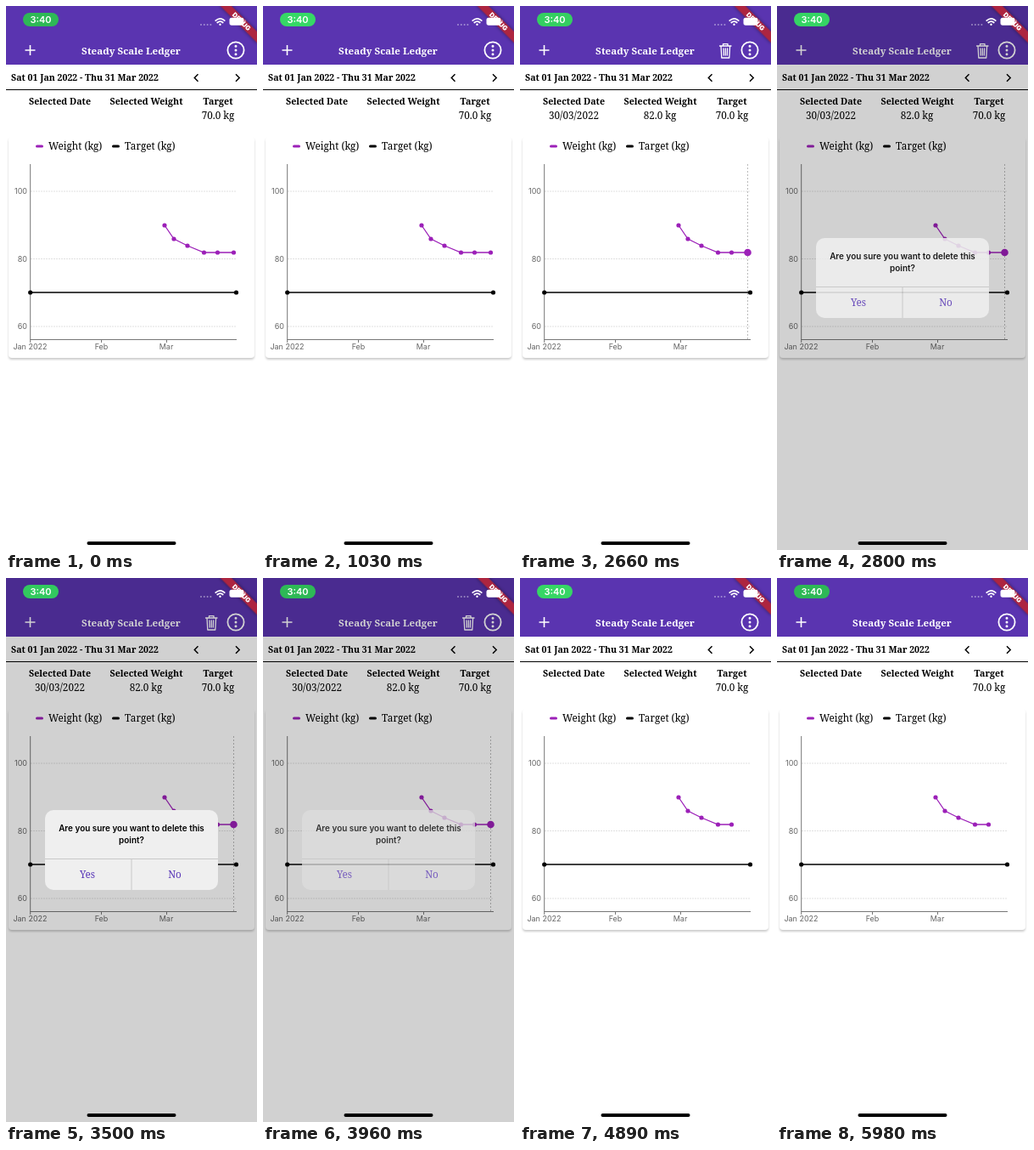
An HTML page that plays this animation: 296x640 px, repeating every 6040 ms.

```html
<!DOCTYPE html>
<html lang="en">
<head>
<meta charset="utf-8">
<title>Weight chart</title>
<style>
  html, body { margin: 0; width: 100%; height: 100%; overflow: hidden; background: #fff; }
  svg { display: block; width: 296px; height: 640px; }
  text { font: 11.7px "Noto Serif", serif; }
  .mid { text-anchor: middle; }
  .bold { font-weight: 700; font-size: 10.7px; }
  .sans, .axis text { font-family: Inter, Roboto, sans-serif; }
  .axis text { font-size: 9px; fill: #666; }
  .question { font-size: 9.95px; font-weight: 600; }
  .icon { fill: none; stroke: #fff; stroke-linecap: round; stroke-linejoin: round; }
  .grid { stroke: #e0e0e0; stroke-dasharray: 2 1; }
  .card { filter: drop-shadow(0 2.5px 1.3px #0003); }
  .ribbon { filter: drop-shadow(0 0 2.3px #0007); }
</style>
</head>
<body>
<svg viewBox="0 0 296 640">
  <clipPath id="plot"><path d="M0 180H296V393H0z"/></clipPath>

  <!-- header -->
  <path fill="#5a34b0" d="M0 0H296V69H0z"/>
  <text class="mid bold" x="147.5" y="56.5" fill="#fff" style="font-size:11.6px">Steady Scale Ledger</text>
  <g class="icon" stroke-width="1.8">
    <path d="M22.5 52h12M28.5 46v12" stroke-width="1.6" stroke-linecap="butt"/>
    <circle cx="271" cy="52" r="9.6"/>
    <path d="M271 47.3v.01M271 52v.01M271 56.7v.01" stroke-width="3"/>
  </g>
  <path id="trash" class="icon" stroke-width="1.3"
    d="M235.5 47h13.5M239.5 47v-2.4h5.5V47M237 47l.8 14h9l.8-14M240 50l.3 8M242.3 50v8M244.6 50l-.3 8"/>

  <!-- date range -->
  <text class="bold" x="6" y="88" style="font-size:10.6px">Sat 01 Jan 2022 - Thu 31 Mar 2022</text>
  <path d="M226.5 80.3l-4.2 4.2 4.2 4.2M271 80.3l4.2 4.2-4.2 4.2" fill="none" stroke="#000" stroke-width="1.5"/>
  <path d="M0 98.5H296" stroke="#000" stroke-width="1.2"/>

  <!-- summary -->
  <g class="mid">
    <text class="bold" x="63.5" y="116">Selected Date</text>
    <text class="bold" x="165.5" y="116">Selected Weight</text>
    <text class="bold" x="250" y="116">Target</text>
    <text x="250" y="133">70.0 kg</text>
    <g id="values">
      <text x="63.5" y="133">30/03/2022</text>
      <text x="165" y="133">82.0 kg</text>
    </g>
  </g>

  <!-- chart card -->
  <rect class="card" x="3" y="154" width="290" height="260" rx="4" fill="#fff"/>
  <g stroke-width="3" stroke-linecap="round">
    <path d="M36.5 165h6" stroke="#9c20b8"/>
    <path d="M126.5 165h6" stroke="#000"/>
  </g>
  <text x="50" y="169">Weight (kg)</text>
  <text x="140" y="169">Target (kg)</text>
  <path class="grid" d="M29 218H272M29 297.5H272M29 377H272"/>
  <path d="M28.7 186V392.5H272M28.7 392v4M112.5 392v4M189.5 392v4" fill="none" stroke="#777"/>
  <g class="axis">
    <g text-anchor="end">
      <text x="25" y="221">100</text>
      <text x="25" y="300.5">80</text>
      <text x="25" y="380">60</text>
    </g>
    <g class="mid">
      <text x="28.5" y="403.5">Jan 2022</text>
      <text x="112.5" y="403.5">Feb</text>
      <text x="189" y="403.5">Mar</text>
    </g>
  </g>
  <path id="guide" d="M268.5 186V392" stroke="#bbb" stroke-dasharray="2 2"/>
  <g id="series" clip-path="url(#plot)"></g>
  <circle id="marker" cx="268.5" fill="#9c20b8"/>

  <!-- dialog -->
  <path id="dim" d="M0 0H296V640H0z" opacity=".18"/>
  <g id="dialog" class="mid">
    <rect id="panel" x="46" y="273" width="204" height="94" rx="10"/>
    <text class="sans question" x="148" y="298">Are you sure you want to delete this</text>
    <text class="sans question" x="148" y="312">point?</text>
    <path d="M46 330.5H250M148 330.5V367" stroke="#c8c8c8"/>
    <g fill="#5a38b8">
      <text x="96" y="353">Yes</text>
      <text x="199" y="353">No</text>
    </g>
  </g>

  <!-- system overlay -->
  <svg width="296" height="69">
    <g transform="translate(296) rotate(45)">
      <path class="ribbon" d="M-31 21.2H31V30.4H-31z" fill="#ad2540"/>
      <text class="mid sans" y="28.6" fill="#fff" style="font-size:7.7px;font-weight:900">DEBUG</text>
    </g>
  </svg>
  <rect id="pill" x="20" y="8" width="42" height="16" rx="8"/>
  <text class="mid sans" x="41" y="20" fill="#fff" style="font-size:11px;font-weight:600">3:40</text>
  <path class="icon" d="M230 22h12" stroke-width="2" stroke-dasharray="0 3.8" opacity=".45"/>
  <g class="icon" stroke-width="1.8" stroke-linecap="butt">
    <path d="M247.3 17.2q5.2-4.6 10.4 0M249.3 19.5q3.2-2.8 6.4 0"/>
    <path d="M252.5 21.7v.01" stroke-width="2.4" stroke-linecap="round"/>
  </g>
  <rect x="263.5" y="13.7" width="17" height="9" rx="2.6" fill="#fff"/>
  <path d="M282 16.5v3.4" stroke="#fff" stroke-width="1.2" opacity=".6"/>
  <rect x="95.5" y="630" width="105" height="4" rx="2"/>
</svg>
<script>
const LOOP = 6040, BASE = 392;
const SELECT = 1740, ASK = 2800, FADE = 3960, DELETE = 4070, RELOAD = 4180;
const weights = [[187, 258], [198, 274], [214, 282], [233.5, 290], [249.5, 290], [268.5, 290]];
const target = [[28.7, 337], [271.5, 337]];

const el = id => document.getElementById(id);
const show = (id, on) => el(id).style.display = on ? '' : 'none';
const clamp = v => Math.max(0, Math.min(1, v));

function line(points, color, width, grow) {
  const moved = points.map(([x, y]) => [x, BASE + (y - BASE) * grow]);
  return `<polyline points="${moved.join(' ')}" fill="none" stroke="${color}" stroke-width="${width}"/>` +
    moved.map(([x, y]) => `<circle cx="${x}" cy="${y}" r="2.6" fill="${color}"/>`).join('');
}

function draw(now) {
  const t = now % LOOP;
  const selected = t >= SELECT && t < DELETE;
  const asking = t >= ASK && t < DELETE;
  const fading = t >= FADE;

  // recording indicator breathes three times per loop
  const glow = (1 - Math.cos(t / LOOP * 6 * Math.PI)) / 2;
  el('pill').setAttribute('fill', `rgb(${46 + 8 * glow},${184 + 32 * glow},${86 + 16 * glow})`);

  show('trash', selected);
  show('values', selected);
  show('dim', asking);
  show('dialog', asking);
  el('dialog').setAttribute('opacity', fading ? .75 : t < ASK + 110 ? .87 : 1);
  el('panel').setAttribute('fill', fading ? '#dedede' : '#efefef');

  // after deletion the highlight sinks to the axis, then the lines grow back
  const sink = clamp((t - DELETE + 105) / 300) * (t >= DELETE);
  const marked = t >= SELECT && sink < 1;
  show('guide', marked);
  show('marker', marked);
  el('marker').setAttribute('cy', 290 + (BASE - 290) * sink);
  el('marker').setAttribute('r', 4.3 * (1 - sink * .5));

  const loaded = t < DELETE || t >= RELOAD;
  const grow = t < DELETE ? 1 : clamp((t - RELOAD + 100) / 300);
  el('series').innerHTML = loaded
    ? line(t < DELETE ? weights : weights.slice(0, 5), '#9c20b8', 1.3, grow) + line(target, '#000', 1.6, grow)
    : '';
}

const start = performance.now();
(function tick() {
  draw(performance.now() - start);
  requestAnimationFrame(tick);
})();
</script>
</body>
</html>
```
